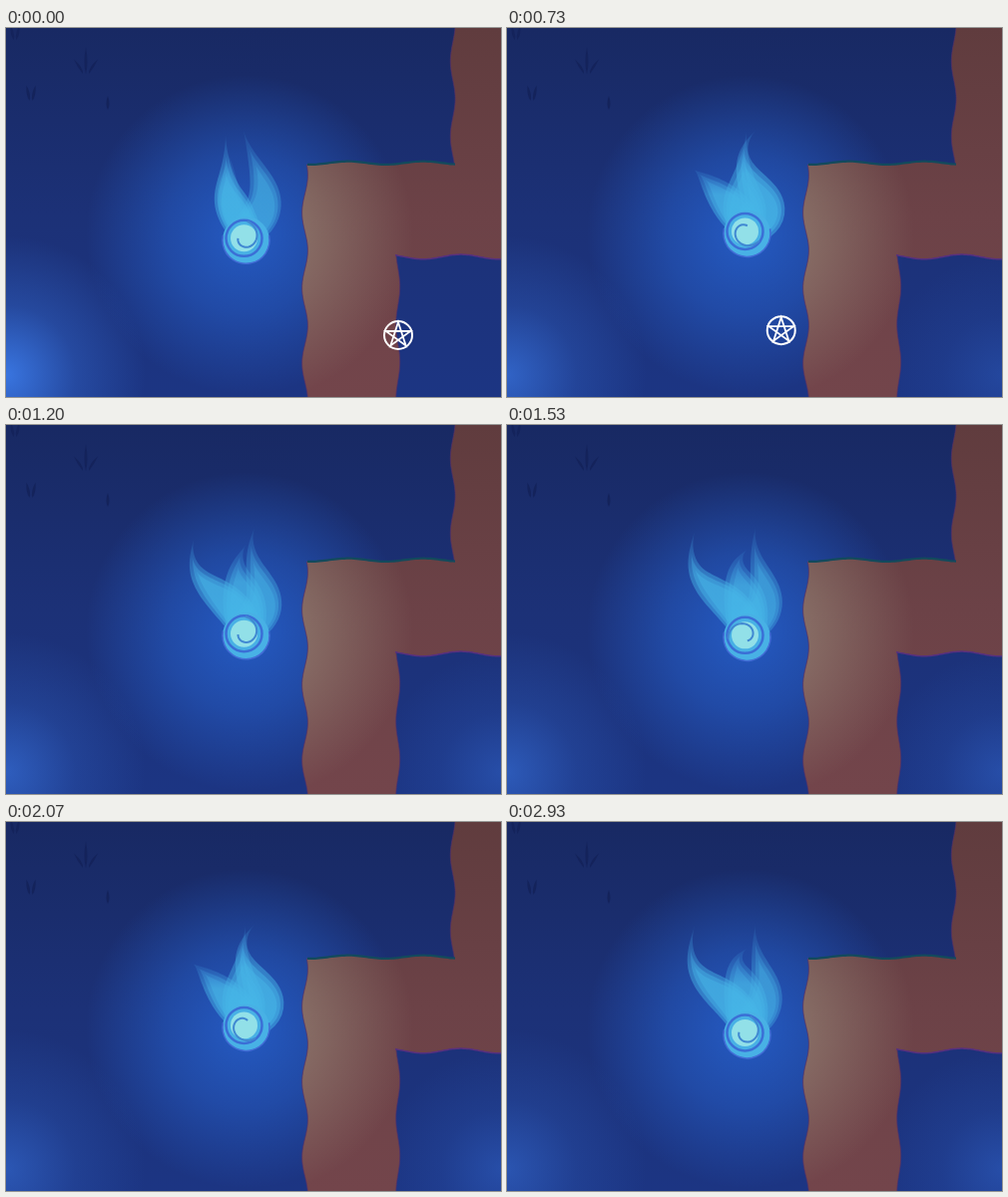
Write an HTML page with a canvas that moves like this. It is 496 by 370 pixels and loops after 3.07 s.

```html
<!DOCTYPE html>
<html lang="en">
<head>
<meta charset="utf-8">
<title>Blue wisp</title>
<style>
html, body { margin: 0; width: 100%; height: 100%; overflow: hidden; background: #1b3078; }
canvas { display: block; }
</style>
</head>
<body>
<canvas id="stage" width="496" height="370"></canvas>
<script>
const W = 496, H = 370, LOOP = 3070, TAU = Math.PI * 2;
const ctx = document.getElementById('stage').getContext('2d');

const smooth = u => {
  u = Math.max(0, Math.min(1, u));
  return u * u * (3 - 2 * u);
};
const bob = t => Math.cos(TAU * (t - 1400) / (LOOP / 2));

// The picture changes twice every 200 ms, in an uneven beat.
function heldTime(now) {
  const phase = (now + 130) % 200;
  return Math.max(0, now - (phase < 60 ? phase : phase - 60));
}

function vertical(...colors) {
  const g = ctx.createLinearGradient(0, 0, 0, H);
  colors.forEach((c, i) => g.addColorStop(i / (colors.length - 1), c));
  return g;
}

function glow(x, y, r, rgb, alpha, middle) {
  const g = ctx.createRadialGradient(x, y, 0, x, y, r);
  g.addColorStop(0, `rgba(${rgb},${alpha})`);
  g.addColorStop(.5, `rgba(${rgb},${alpha * middle})`);
  g.addColorStop(1, `rgba(${rgb},0)`);
  ctx.fillStyle = g;
  ctx.fillRect(x - r, y - r, 2 * r, 2 * r);
}

function circle(x, y, r) {
  ctx.beginPath();
  ctx.arc(x, y, r, 0, TAU);
}

function stroke(color, width) {
  ctx.strokeStyle = color;
  ctx.lineWidth = width;
  ctx.stroke();
}

// All rock edges share one wavelength.
function wave(from, to, base, height, crest, upright) {
  const points = [];
  for (let i = 0; i <= 60; i++) {
    const along = from + (to - from) * i / 60;
    const across = base + height * Math.cos(TAU * (along - crest) / 75.5);
    points.push(upright ? [across, along] : [along, across]);
  }
  return points;
}
const wall = wave(-2, 137, 447.7, 2.4, 71, true);
const ledge = wave(450, 302, 135.3, 1.6, 305, false);
const side = wave(137, 372, 299.5, 2.9, 223, true);
const inner = wave(372, 227, 392.7, 2, 335, true);
const under = wave(390, 498, 229.4, 2.3, 418, false);

function trace(points) {
  ctx.beginPath();
  points.forEach(p => ctx.lineTo(...p));
}

function tuft(x, y, size, count) {
  ctx.fillStyle = '#14235b';
  for (let i = 0; i < count; i++) {
    const lean = i - (count - 1) / 2;
    const length = size * (1 - Math.abs(lean) * .45);
    const rootX = x + lean * 3, tipX = x + lean * size * .45;
    ctx.beginPath();
    ctx.moveTo(rootX, y);
    ctx.quadraticCurveTo(rootX + lean * 2 - 3, y - length * .4, tipX, y - length);
    ctx.quadraticCurveTo(rootX + lean * 2 + 3, y - length * .4, rootX, y);
    ctx.fill();
  }
}

function drawScene(t) {
  ctx.fillStyle = vertical('#182963', '#1c3177', '#1c3583');
  ctx.fillRect(0, 0, W, H);
  glow(0, 348, 140, '62,128,240', .4 + .45 * Math.exp(-t / 1000), .33);
  glow(W, 348, 120, '55,115,225', .4 * smooth(t / 1100), .33);
  glow(240, 207, 160, '38,98,208', .85, .58);
  tuft(80, 46, 27, 3);
  tuft(25, 73, 20, 2);
  tuft(102, 82, 14, 1);
  tuft(9, 12, 18, 2);

  trace([...wall, ...ledge, ...side, ...inner, ...under, [498, -2]]);
  ctx.fillStyle = vertical('#603c3e', '#6c4247', '#73454b');
  ctx.fill();
  ctx.save();
  ctx.clip();
  glow(240, 207, 168, '160,150,130', .75, .52);
  ctx.restore();
  for (const edge of [wall, side, inner]) {
    trace(edge);
    stroke('rgba(84,48,105,.7)', 1);
  }
  trace(under);
  stroke('#58307f', 1.5);
  trace(ledge);
  stroke('#134a5c', 2.2);
}

// Each tongue: lower point, upper point, tip, half width, opacity.
// The tongues fan out from upright as the loop begins, then sway with the bob.
function tongues(t) {
  const b = bob(t), lean = smooth(t / 700), fold = 1 - lean;
  return [
    [[257 + 2 * b, 174], [246 + 7 * b, 142], [238 + 11 * lean, 103], 18 - 2 * b, .75 - .15 * b],
    [[218 + 9 * fold - 2 * b, 174], [196 + 30 * fold - 6 * b, 152 - 3 * b],
      [188 + 32 * fold, 124 - 20 * b], 16, .85],
    [[237 - 13 * fold, 171], [234 - 8 * fold - 3 * b, 146], [240 - 18 * fold, 115 + 12 * b],
      19 - 7 * fold, .75 - .3 * fold]
  ];
}

// Cubic through four values at s = 0, 1/3, 2/3 and 1.
function through(a, b, c, d, s) {
  const u = 3 * s;
  return -a * (u - 1) * (u - 2) * (u - 3) / 6 + b * u * (u - 2) * (u - 3) / 2
    - c * u * (u - 1) * (u - 3) / 2 + d * u * (u - 1) * (u - 2) / 6;
}

function drawTongue([low, high, tip, width, alpha], rootY) {
  const root = [240, rootY];
  const at = s => [0, 1].map(i => through(root[i], low[i], high[i], tip[i], s));
  const shade = ctx.createLinearGradient(0, tip[1], 0, rootY);
  shade.addColorStop(0, 'rgba(66,160,228,.3)');
  shade.addColorStop(.45, 'rgb(70,180,230)');
  shade.addColorStop(1, 'rgb(70,184,232)');
  ctx.fillStyle = shade;
  ctx.globalAlpha = alpha * .55;
  for (const reach of [1, .86, .72]) {
    const left = [], right = [];
    for (let k = 0; k <= 1; k += 1 / 32) {
      const s = k * reach;
      const [x, y] = at(s), [x0, y0] = at(s - .01), [x1, y1] = at(s + .01);
      const half = width * reach * Math.pow(1 - k, 1.6) * (1 + 3 * k) / Math.hypot(x1 - x0, y1 - y0);
      const dx = (y1 - y0) * half, dy = (x0 - x1) * half;
      left.push([x + dx, y + dy]);
      right.unshift([x - dx, y - dy]);
    }
    trace(left.concat(right));
    ctx.fill();
  }
  ctx.globalAlpha = 1;
}

function drawWisp(t) {
  const y = 209.5 + 3.9 * bob(t);
  tongues(t).forEach(tongue => drawTongue(tongue, y - 8));

  circle(240.5, y, 23.5);
  ctx.fillStyle = '#48b1e5';
  ctx.fill();
  ctx.beginPath();
  ctx.arc(240.5, y, 23.5, -.2, Math.PI + .2);
  stroke('#426dd6', 1.5);

  const x = 238.5, cy = y - 2;
  circle(x, cy, 18);
  stroke('#3b6fd6', 2.5);
  circle(x, cy, 13.5);
  ctx.fillStyle = '#92e0e8';
  ctx.fill();

  // Two turns per loop, quick at first.
  const angle = Math.PI / 2 - 2 * TAU * (1 - Math.pow(1 - t / LOOP, 1.55));
  ctx.beginPath();
  for (let k = 0; k <= 1; k += .04) {
    const a = angle + Math.PI * (.5 - 1.5 * k), r = 6 + 6 * k * (1 + k);
    ctx.lineTo(x + r * Math.cos(a), cy + r * Math.sin(a));
  }
  stroke('#4088d2', 2);
}

function drawCursor(t) {
  const u = t / 1000;
  const x = 393 - 162 * u, y = 308 - 42 * u + 91 * u ** 4;
  circle(x, y, 14);
  stroke('#fff', 2);
  ctx.beginPath();
  for (let i = 0; i < 5; i++) {
    const a = TAU * (i * 2 / 5 - 1 / 4);
    ctx.lineTo(x + 13 * Math.cos(a), y + 13 * Math.sin(a));
  }
  ctx.closePath();
  stroke('#fff', 1.8);
}

function frame() {
  const t = heldTime(performance.now() % LOOP);
  drawScene(t);
  drawWisp(t);
  drawCursor(t);
  requestAnimationFrame(frame);
}
frame();
</script>
</body>
</html>
```
